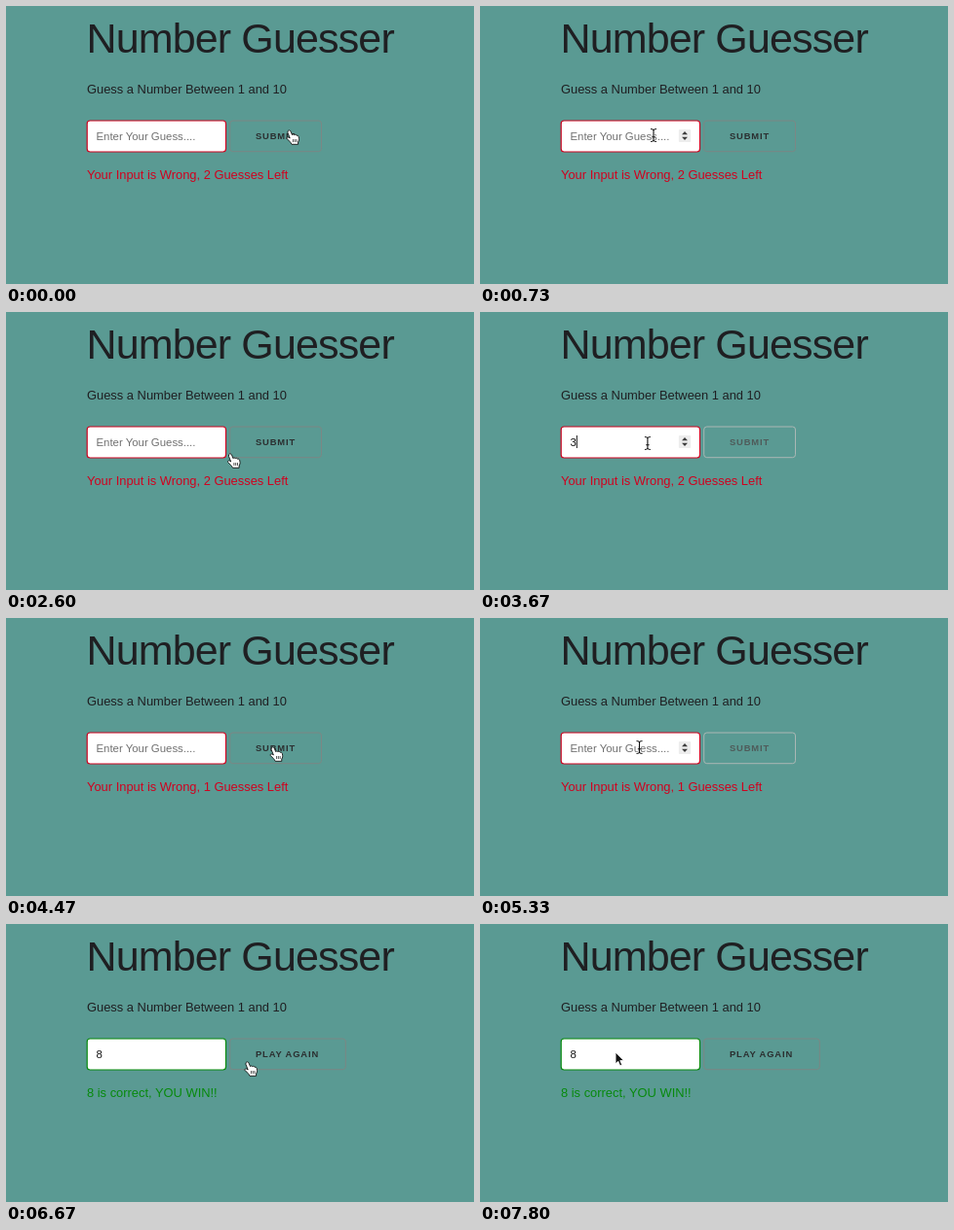
Write an HTML page that moves like this. It is 480 px wide and 286 px high and loops after 8 s.

```html
<!DOCTYPE html>
<html lang="en">
<head>
<meta charset="utf-8">
<title>Number Guesser</title>
<style>
  html, body { margin: 0; width: 100%; height: 100%; overflow: hidden; background: #5a9a93; }
  svg { display: block; width: 480px; height: 286px; cursor: default; }
  text { font-family: "Liberation Sans", Arial, sans-serif; font-size: 12.9px; fill: #1f1f22; white-space: pre; }
  #title { font-size: 43px; letter-spacing: -.86px; }
  #value { font-size: 11.4px; }
  #label { font-size: 9.4px; font-weight: bold; letter-spacing: .86px; }
</style>
</head>
<body>
<svg viewBox="0 0 480 286">
  <text id="title" x="82.5" y="48">Number Guesser</text>
  <text x="83" y="90">Guess a Number Between 1 and 10</text>

  <rect id="field" x="83.2" y="118" width="142.3" height="32" rx="3" fill="#fff" stroke-width="1.2"/>
  <text id="value" x="92.5" y="137.6"></text>
  <path id="caret" d="M0 127v13" stroke="#111" stroke-width="1"/>
  <g id="spinner">
    <rect x="203.8" y="127" width="12.4" height="13" rx="1" fill="#ededed"/>
    <path d="M207 132.3l3-3.4 3 3.4zM207 134.7l3 3.4 3-3.4z" fill="#3c3c3c"/>
  </g>

  <rect id="button" x="229.7" y="118" height="31.7" rx="3" fill="none" stroke-width=".9"/>
  <text id="label" x="256" y="137.3"></text>
  <text id="message" x="83" y="177.8"></text>

  <g id="hand" stroke="#111" stroke-width=".9" stroke-linejoin="round">
    <path fill="#fff" d="M-3 .8C-2-.6-.6-.4 0 1L1.5 4.6C2 3.6 3.4 3.8 3.8 4.8 4.4 4 5.8 4.3 6 5.3 7 4.9 8 5.5 8.2 6.6 8.8 9.5 8.6 10.5 7.6 12V14.3H1C0 12-2 10.5-3.8 8.6-4.6 7.6-3.4 6.4-2 7.2L-.8 8-3 2.5Z"/>
    <path fill="none" stroke-width=".7" d="M2.4 9v3M4.2 9v3M6 9v3"/>
  </g>
  <g id="beam" fill="none">
    <path stroke="#fff" stroke-width="2.4" d="M0-6V6"/>
    <path stroke="#111" stroke-width="1.1" d="M-3-6.5Q-.3-6.5 0-5.2.3-6.5 3-6.5M0-5.2V5.2M-3 6.5Q-.3 6.5 0 5.2.3 6.5 3 6.5M-1.7 1.8H1.7"/>
  </g>
  <path id="arrow" fill="#111" stroke="#fff" stroke-width=".9" stroke-linejoin="round"
        d="M0 0V11.8L2.7 9.3 4.6 13.8 6.7 12.9 4.8 8.6H8.5Z"/>
</svg>
<script>
const LOOP = 8000, FPS = 15, BLINK = 533;
const RED = '#d0021f', GREEN = '#078a0c';
const $ = id => document.getElementById(id);

// Pointer path: time, x, y
const path = [
  [0, 292, 128], [330, 214, 138], [530, 155, 134], [730, 178, 133],
  [1950, 178, 133], [2530, 231.5, 146], [2670, 231.5, 146], [2930, 168.5, 135],
  [3620, 168.5, 135], [4070, 282, 133],
  [4420, 282, 133], [4740, 163.5, 133],
  [5830, 163.5, 133], [6530, 249, 142],
  [7020, 249, 142], [7530, 110, 131], [7800, 139, 132], [LOOP, 139, 132]
];

const wrong = left => `Your Input is Wrong, ${left} Guesses Left`;

// Each event changes part of the form; typing and clicking restart the caret blink
const events = [
  { at: 0, value: '', message: wrong(2), focus: 'button', won: false },
  { at: 3000, focus: 'field' },
  { at: 3400, value: '3' },
  { at: 4200, value: '', message: wrong(1), focus: 'button' },
  { at: 4800, focus: 'field' },
  { at: 5730, value: '8' },
  { at: 6667, message: '8 is correct, YOU WIN!!', focus: 'button', won: true }
];

function pointerAt(t) {
  const i = path.findIndex(p => p[0] > t);
  const [t0, x0, y0] = path[i - 1], [t1, x1, y1] = path[i];
  const u = (t - t0) / (t1 - t0), e = u * u * (3 - 2 * u);
  return [x0 + (x1 - x0) * e, y0 + (y1 - y0) * e];
}

const show = (id, on) => $(id).setAttribute('visibility', on ? 'visible' : 'hidden');

function render(t) {
  const form = Object.assign({}, ...events.filter(e => e.at <= t + 4));
  const [x, y] = pointerAt(t);
  const { won, value } = form;
  const buttonWidth = won ? 118.6 : 93.8;
  const inRow = y > 118 && y < 150;
  const overField = inRow && x > 83 && x < 225.5 && !won;
  const overButton = inRow && x > 229.5 && x < 229.5 + buttonWidth;
  const focused = form.focus === 'field';
  const active = overButton || !focused;
  const color = won ? GREEN : RED;

  $('field').setAttribute('stroke', color);
  $('value').textContent = value || 'Enter Your Guess....';
  $('value').style.fill = value ? '#151515' : '#707070';
  $('caret').setAttribute('transform', `translate(${value ? 99.3 : 93})`);
  show('caret', focused && (t + 4 - form.at) % (2 * BLINK) < BLINK);
  show('spinner', overField || (focused && !won));

  $('button').setAttribute('width', buttonWidth);
  $('button').setAttribute('stroke', active ? '#7f8583' : '#b4bab8');
  $('label').textContent = won ? 'PLAY AGAIN' : 'SUBMIT';
  $('label').style.fill = active ? '#2b2f30' : '#4f5b5a';
  $('message').textContent = form.message;
  $('message').style.fill = color;

  const cursor = overField ? 'beam' : overButton ? 'hand' : 'arrow';
  for (const id of ['beam', 'hand', 'arrow']) show(id, id === cursor);
  $(cursor).setAttribute('transform', `translate(${x} ${y})`);
}

const start = performance.now();
function tick() {
  const t = Math.max(0, performance.now() - start) % LOOP;
  render(Math.min(Math.floor((t + 4) * FPS / 1000) * 1000 / FPS, LOOP - 1));
  requestAnimationFrame(tick);
}
tick();
</script>
</body>
</html>
```
